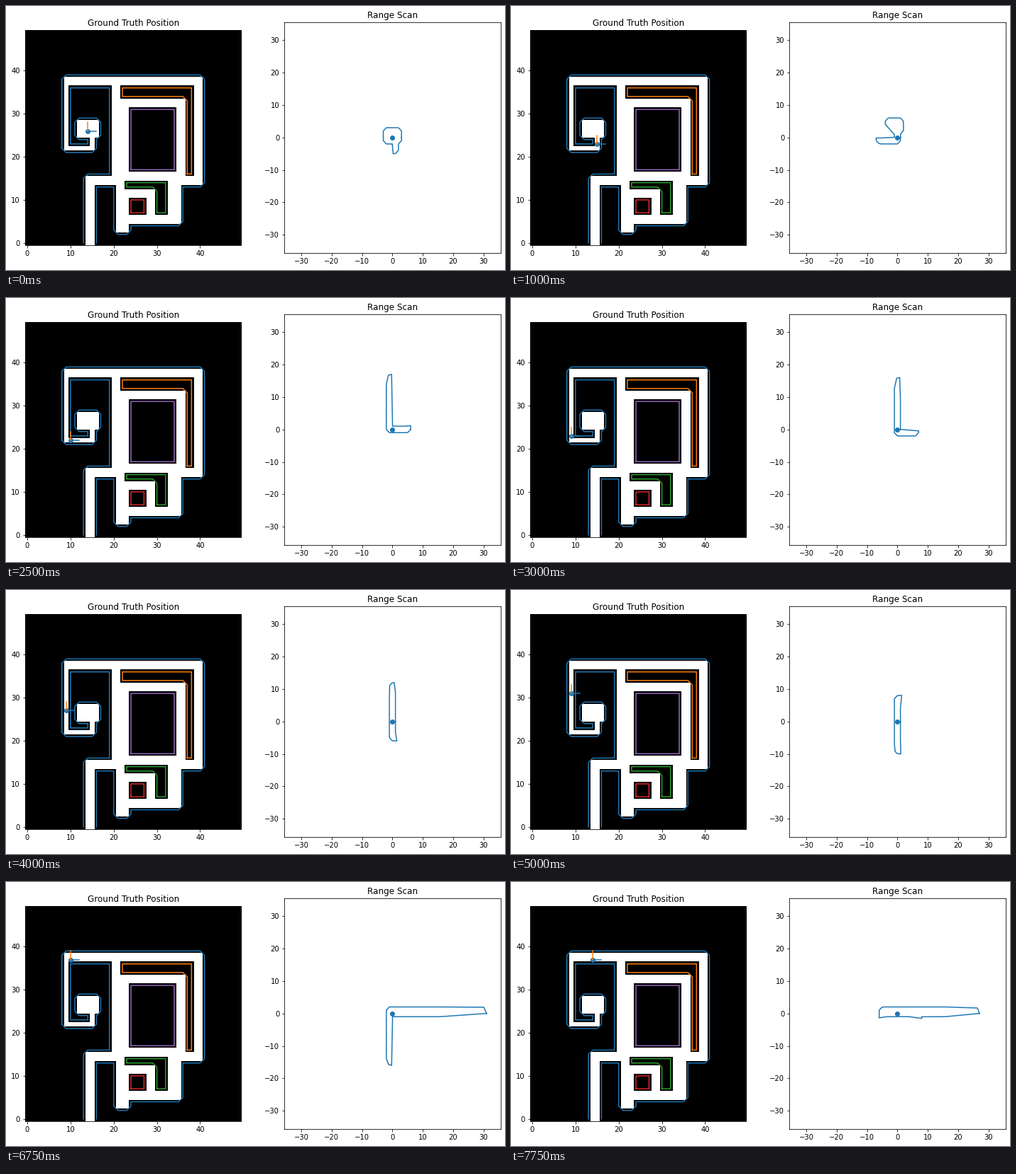
A matplotlib script that plays this animation: 703 by 373 pixels, repeating every 8 s.

```python
import numpy as np
import matplotlib.pyplot as plt
from matplotlib.animation import FuncAnimation

W, H, DPI = 703, 373, 72
SIZE = 50
plt.rcParams.update({"font.family": "DejaVu Sans", "font.size": 10})


def walk(*corners):
    """Unit steps through axis-aligned corners."""
    path = [np.array(corners[0])]
    for corner in corners[1:]:
        while (path[-1] != corner).any():
            path.append(path[-1] + np.sign(np.array(corner) - path[-1]))
    return path


def fill(value, x0, y0, x1, y1):
    grid[y0:y1 + 1, x0:x1 + 1] = value


path = walk((14, 26), (15, 26), (15, 22), (9, 22), (9, 37), (14, 37))

# Floor plan: 1 is open floor, 0 is solid
grid = np.zeros((SIZE, SIZE))
for x, y in path:
    grid[y, x] = 1
fill(1, 12, 25, 16, 28)   # start room
fill(1, 9, 37, 40, 38)    # top corridor
fill(1, 20, 14, 40, 38)   # main hall
fill(1, 14, 14, 40, 15)   # entrance corridor
fill(1, 14, 0, 15, 15)
fill(1, 21, 5, 35, 15)    # lower room
fill(1, 21, 3, 23, 5)
fill(0, 22, 34, 38, 36)   # hook
fill(0, 37, 16, 38, 36)
fill(0, 23, 13, 32, 14)   # elbow
fill(0, 30, 7, 32, 14)
fill(0, 24, 7, 27, 10)    # pillars
fill(0, 24, 17, 34, 31)

fig = plt.figure(figsize=((W + 1e-6) / DPI, (H + 1e-6) / DPI), dpi=DPI,
                 facecolor="white")


def panel(x, y, w, h, title, lo, hi, ticks):
    ax = fig.add_axes([x / W, y / H, w / W, h / H])
    ax.set(xlim=(lo, hi), ylim=(lo, hi), xticks=ticks, yticks=ticks,
           autoscale_on=False)
    ax.set_title(title)
    return ax


side, tall, left, bottom = 304.364, 326.16, 26.95, 24.22
world = panel(left, bottom + (tall - side) / 2, side, side,
              "Ground Truth Position", -0.5, SIZE - 0.5, range(0, SIZE, 10))
view = panel(left + 1.2 * side, bottom, side, tall,
             "Range Scan", -35.55, 35.55, range(-30, 40, 10))


def trace_walls():
    """Outlines of the open floor, ordered from left to right."""
    lines = world.contour(grid, levels=[1e-3])
    walls = lines.allsegs[0]
    lines.remove()
    return sorted(walls, key=lambda w: tuple(w.min(axis=0).round()))


walls = trace_walls()
world.imshow(grid, cmap="gray", origin="lower", interpolation="nearest",
             aspect="auto")
for i, wall in enumerate(walls):
    world.plot(*wall.T, color=f"C{i}")
world.set(xlim=(-0.5, SIZE - 0.5), ylim=(-0.5, SIZE - 0.5))

starts = np.vstack([w[:-1] for w in walls])
edges = np.vstack([np.diff(w, axis=0) for w in walls])
angles = np.linspace(0, 2 * np.pi, 100)
rays = np.column_stack([np.cos(angles), np.sin(angles)])


def cross(a, b):
    return a[..., 0] * b[..., 1] - a[..., 1] * b[..., 0]


def scan(pos):
    """Nearest wall hit along every ray, relative to pos."""
    eps = 1e-9
    rel = starts - pos
    det = cross(rays[:, None], edges[None])
    det = np.where(np.abs(det) < 1e-12, np.nan, det)
    dist = cross(rel, edges)[None] / det
    along = cross(rel[None], rays[:, None]) / det
    hit = (dist > eps) & (along >= -eps) & (along <= 1 + eps)
    return rays * np.where(hit, dist, np.inf).min(axis=1)[:, None]


robot, = world.plot([], [], "o", color="C0")
x_axis, = world.plot([], [], color="C0")
y_axis, = world.plot([], [], color="C1")
outline, = view.plot([], [], color="C0")
view.plot(0, 0, "o", color="C0")


def update(i):
    x, y = path[i]
    robot.set_data([x], [y])
    x_axis.set_data([x, x + 2], [y, y])
    y_axis.set_data([x, x], [y, y + 2])
    outline.set_data(*scan(path[i]).T)
    return robot, x_axis, y_axis, outline


anim = FuncAnimation(fig, update, frames=len(path), interval=250, repeat=True)
plt.show()
```
